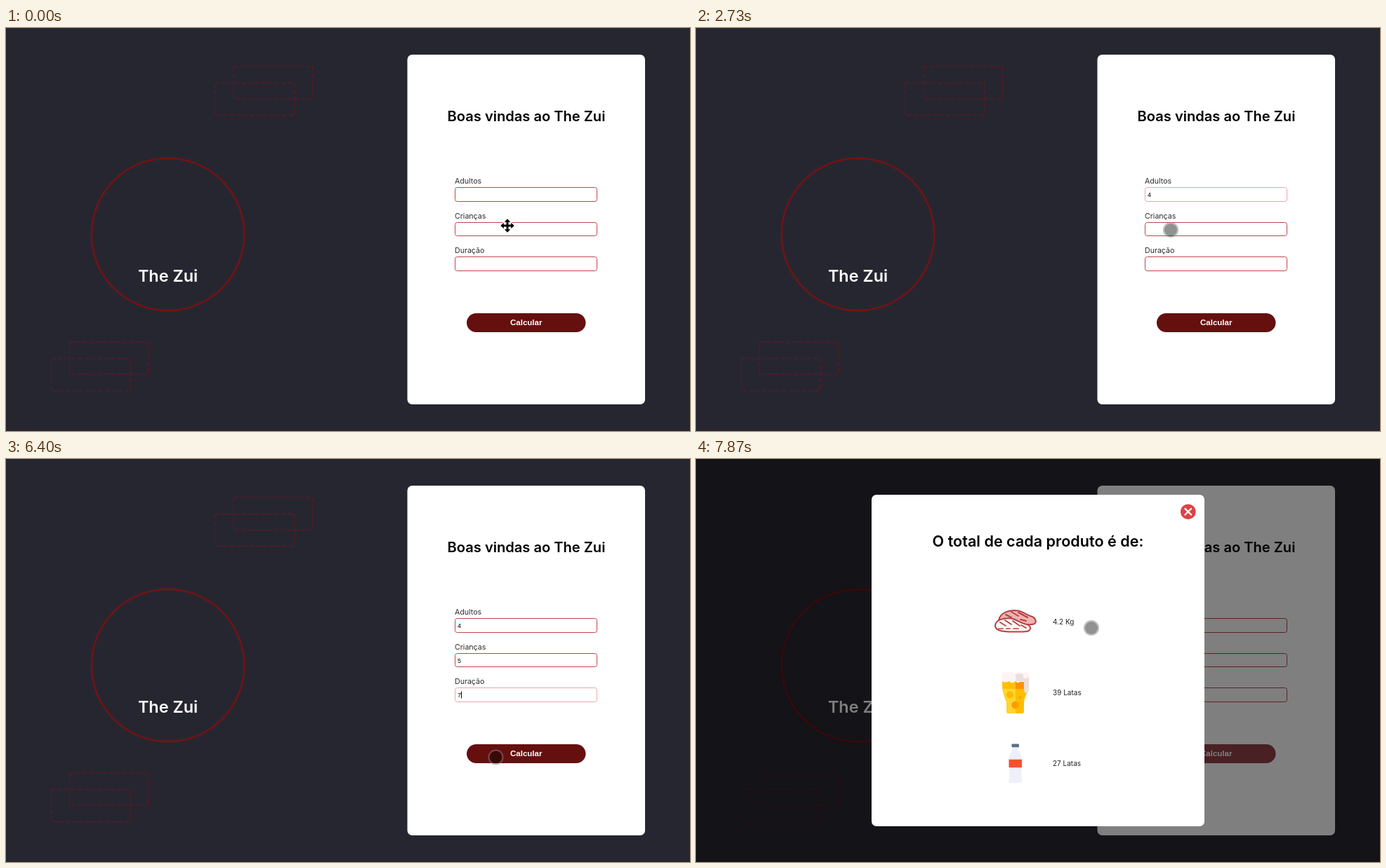
Recreate the animation shown at these times as an HTML page. Size 974 by 575 pixels, loop 8 s.

```html
<!DOCTYPE html>
<html lang="pt-BR">
<head>
<meta charset="utf-8">
<title>Calculadora de churrasco</title>
<style>
  html, body { margin: 0; width: 100%; height: 100%; overflow: hidden; background: #262631; }
  svg { display: block; width: 974px; height: 575px; }
  text { font-family: Inter, "Open Sans", sans-serif; }
  .ui { font-family: "Liberation Sans", Arial, sans-serif; }
  .title { font-weight: 600; text-anchor: middle; }
  .dash { fill: none; stroke: #5b1a22; stroke-width: 1.4; stroke-dasharray: 6 3.4; }
  .label { font-size: 10.6px; fill: #2b2b2b; }
  .amount { font-size: 10px; fill: #222; }
</style>
</head>
<body>
<svg viewBox="0 0 974 575" xmlns="http://www.w3.org/2000/svg">
  <rect width="974" height="575" fill="#262631"/>
  <defs>
    <g id="frames">
      <rect class="dash" x="26" width="112.5" height="46"/>
      <rect class="dash" y="23.5" width="112.5" height="46"/>
    </g>
  </defs>
  <use href="#frames" x="298" y="55"/>
  <use href="#frames" x="64.5" y="448"/>

  <circle cx="230.5" cy="294.5" r="108.7" fill="none" stroke="#741313" stroke-width="2.5"/>
  <text class="title" x="230.5" y="361.5" font-size="23.4" fill="#fff">The Zui</text>

  <rect x="571.5" y="38" width="338.5" height="499" rx="7" fill="#fff"/>
  <text class="title" x="741" y="132.5" font-size="20.1">Boas vindas ao The Zui</text>
  <g id="fields"></g>
  <rect id="button" x="656" y="407" width="169.5" height="27" rx="13.5"/>
  <text class="ui" x="740.7" y="424" font-size="11.5" font-weight="700" text-anchor="middle" fill="#fff">Calcular</text>

  <g id="modal">
    <rect width="974" height="575" fill="#000" opacity=".5"/>
    <rect x="250" y="51" width="474" height="473" rx="7" fill="#fff"/>
    <circle cx="700.8" cy="75.2" r="10.8" fill="#e04246"/>
    <path d="M696.5 70.9l8.6 8.6m0-8.6l-8.6 8.6" stroke="#fff" stroke-width="2.3" stroke-linecap="round"/>
    <text class="title" x="487" y="125" font-size="21.6">O total de cada produto é de:</text>

    <g stroke="#b83f45" stroke-width="2" stroke-linecap="round" stroke-linejoin="round">
      <path fill="#efb3b1" d="M431 230C433 220 445 214 459 216.500C466 218 470 222 476 224C484 226 486 233 481 235.500C477 237 460 236 450 233Z"/>
      <path fill="none" d="M441 222l8 4m0-8l10 6m0-5l13 7m-10 3l8 2"/>
      <path fill="#fff5f3" d="M426 238C426 230 438 226 449 227.500C457 229 462 234 469 235.500C477 237 478 243 473 245.500C470 247 460 246.500 452 246.500C440 246.500 426 246 426 238Z"/>
      <path fill="none" stroke-width="1.7" d="M433 233l8 5m-1-8l9 6m2-5l10 7m2-1l7 4m-39 1h6m5 0h5m5 0h7"/>
    </g>

    <g>
      <path fill="#ffd52f" d="M436 315H455V363H444Q442 363 442 360V347Q436 334 436 324Z"/>
      <path fill="#ffbd00" d="M455 315H473V331Q467 341 467 349V360Q467 363 464 363H455Z"/>
      <path fill="#ffbf00" d="M436 316H455V328H436.500Z"/>
      <path fill="#ff9300" d="M455 316H467V328H455Z"/>
      <path fill="#fff4f3" d="M435.500 312C434 305 440 302 445 304Q449 302 453 306Q460 302 466 306Q473 302 474 309V318H461Q458 321 455 317Q450 322 446 317Q440 320 436 317Z"/>
      <path fill="#ecdfdf" d="M455 307Q461 305 466 307V312Q471 315 474 310V331Q473 335 470 334Q467 333 467 328V317H455Z"/>
      <circle cx="447" cy="336.500" r="5" fill="#ffb900"/>
      <circle cx="454.500" cy="351" r="5.300" fill="#ff9d00"/>
      <circle cx="461.500" cy="340" r="1.500" fill="#ff9300"/>
    </g>

    <path fill="#eeeff8" d="M450 410H459V416Q464 422 464 429L463 444L464 459Q464 462 461 462H448Q445.500 462 445.500 459L446.500 444L445.500 429Q446 422 450 416Z"/>
    <rect x="449.500" y="406.500" width="10.500" height="4.700" rx="1" fill="#5c7184"/>
    <rect x="445.500" y="428.700" width="18.500" height="11.500" fill="#f55030"/>

    <text class="amount" x="508" y="235.500">4.2 Kg</text>
    <text class="amount" x="508" y="337">39 Latas</text>
    <text class="amount" x="508" y="438">27 Latas</text>
    <rect id="tap" x="656" y="407" width="170" height="27" fill="#33b5e5"/>
  </g>

  <g id="pointer">
    <path id="cross" stroke="#fff" stroke-width="2" paint-order="stroke" stroke-linejoin="round"/>
    <g id="touch">
      <circle r="10" fill="none" stroke="#828282" stroke-opacity=".5" stroke-width="2.200"/>
      <circle r="9" fill="#000" opacity=".43"/>
    </g>
  </g>
</svg>
<script>
const LOOP = 8000, TICK = 1000 / 15;
const $ = id => document.getElementById(id);
const clamp = v => Math.max(0, Math.min(1, v));
const show = (el, on) => el.setAttribute('visibility', on ? 'visible' : 'hidden');

// Focus, blur and typing times, plus the spans in which the caret is lit.
const fields = [
  { label: 'Adultos', digit: 4, top: 227.5, h: 20, focus: 870, blur: 3000, typed: 2000, caret: [[930, 1400], [1930, 2530]] },
  { label: 'Crianças', digit: 5, top: 277.5, h: 19, focus: 3000, blur: 4670, typed: 3800, caret: [[3070, 3530], [3800, 4330]] },
  { label: 'Duração', digit: 7, top: 326.5, h: 20, focus: 4670, blur: 6470, typed: 5400, caret: [[4670, 5130], [5400, 5930], [6400, 6470]] }
];

// Pointer stops: time, x, y
const stops = [
  [0, 714, 282], [60, 714, 282], [200, 713, 289], [530, 708, 245], [600, 708, 245],
  [670, 708, 244], [800, 708, 244], [866, 706.5, 241.5], [2130, 706.5, 241.5],
  [2530, 677, 293], [2600, 677, 293], [2730, 676, 288], [3870, 676, 288],
  [4330, 672.5, 337], [5330, 672.5, 337], [5530, 671, 336.5], [5600, 671, 336.5],
  [6130, 697.5, 425.5], [6600, 697.5, 425.5], [7200, 512, 226], [7400, 498, 233],
  [7866, 563, 241], [LOOP, 563, 241]
];

$('fields').innerHTML = fields.map(f => `
  <text class="label" x="639" y="${f.top - 5.7}">${f.label}</text>
  <rect x="639.5" y="${f.top}" width="202" height="${f.h}" rx="3" fill="#fff"/>
  <text class="ui" x="643" y="${f.top + 13.5}" font-size="9">${f.digit}</text>
  <rect y="${Math.floor(f.top) + 5.5}" width="1" height="10"/>`).join('');
const nodes = $('fields').children;
fields.forEach((f, i) => [, f.box, f.value, f.bar] = [...nodes].slice(i * 4, i * 4 + 4));

$('cross').setAttribute('d', 'M' + [0, 1, 2, 3].map(k => {
  const arm = [[-1.5, -1.5], [-1.5, -5.2], [-4.3, -5.2], [0, -9.7], [4.3, -5.2], [1.5, -5.2]];
  const c = [1, 0, -1, 0][k], s = [0, 1, 0, -1][k];
  return arm.map(([x, y]) => [x * c - y * s, x * s + y * c]).join('L');
}).join('L') + 'Z');

function pointerAt(t) {
  const i = Math.max(1, stops.findIndex(s => s[0] >= t));
  const [t0, x0, y0] = stops[i - 1], [t1, x1, y1] = stops[i];
  const p = clamp((t - t0) / (t1 - t0)), e = p * p * (3 - 2 * p);
  return [x0 + (x1 - x0) * e, y0 + (y1 - y0) * e];
}

function render(time) {
  const t = Math.floor((time % LOOP) / TICK + 0.06) * TICK;
  const past = at => t + 5 >= at;

  for (const f of fields) {
    const typed = past(f.typed);
    f.box.setAttribute('stroke', past(f.focus) && !past(f.blur) ? '#eaa6aa' : '#c1444a');
    show(f.value, typed);
    f.bar.setAttribute('x', typed ? 648 : 643);
    show(f.bar, f.caret.some(([on, off]) => past(on) && !past(off)));
  }

  const fade = clamp((t - 6600) / 270);
  const mix = (a, b) => Math.round(a + (b - a) * fade);
  $('button').setAttribute('fill', `rgb(${mix(101, 148)},${mix(16, 64)},${mix(15, 71)})`);
  $('tap').setAttribute('opacity', 0.4 * (1 - fade));
  $('modal').setAttribute('display', past(6470) ? 'inline' : 'none');

  $('pointer').setAttribute('transform', `translate(${pointerAt(Math.min(t, LOOP))})`);
  show($('cross'), !past(870));
  show($('touch'), past(870));
}

const start = performance.now();
function loop() {
  render(performance.now() - start);
  requestAnimationFrame(loop);
}
loop();
</script>
</body>
</html>
```
